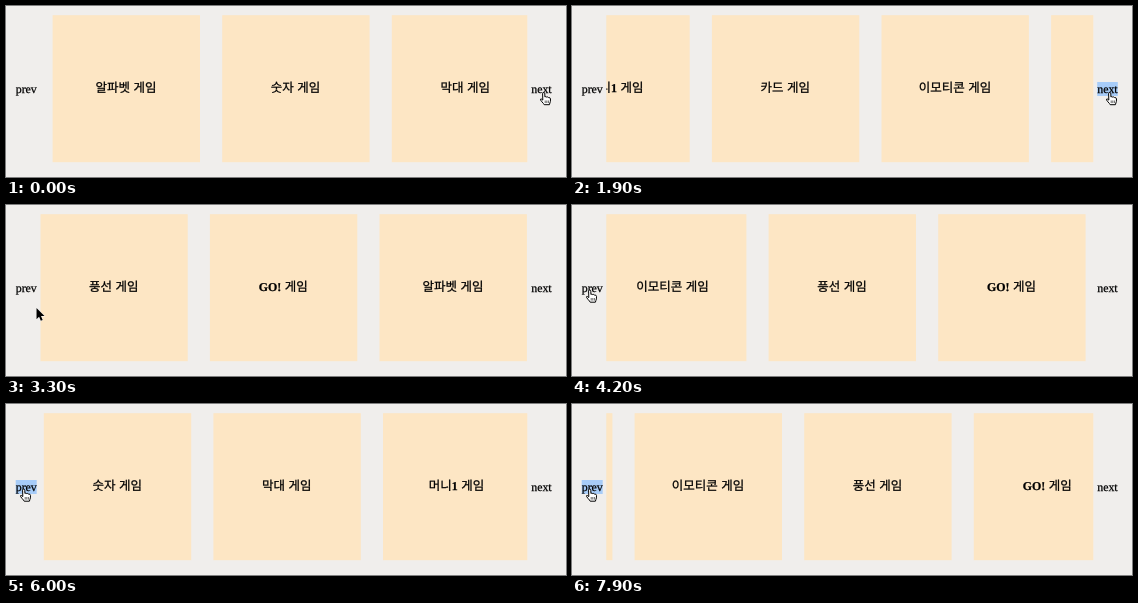
Write an HTML page that moves like this. It is 560 px wide and 171 px high and loops after 8000 ms.

```html
<!DOCTYPE html>
<html lang="ko">
<head>
<meta charset="utf-8">
<title>Card carousel</title>
<style>
  html, body { margin: 0; width: 100%; height: 100%; overflow: hidden; background: #f0eeec; }
  svg { display: block; }
  text { stroke: #000; stroke-width: .25; text-rendering: geometricPrecision; }
  .nav, .latin { font: 11.9px "Liberation Serif", Times, serif; }
  .latin { font-weight: bold; }
  .title { font: 12.5px "Noto Sans CJK KR", "Noto Sans CJK", sans-serif; text-anchor: middle; }
  .mark { fill: #a7ccf8; }
  .card { fill: #fde6c4; }
</style>
</head>
<body>
<svg width="560" height="171" viewBox="0 0 560 171">
  <clipPath id="view"><rect x="34.3" y="0" width="487" height="171"/></clipPath>
  <g clip-path="url(#view)"><g id="track"></g></g>
  <rect id="prevMark" class="mark" x="9.7" y="76" width="21" height="14"/>
  <rect id="nextMark" class="mark" x="525.2" y="76" width="20.6" height="14"/>
  <text class="nav" x="9.7" y="86.5">prev</text>
  <text class="nav" x="525.2" y="86.5">next</text>
  <path id="arrow" fill="#000" stroke="#fff" stroke-width=".9" paint-order="stroke"
        d="M0 0V11.2L2.6 8.8 4.3 12.7 6.2 11.9 4.5 8.1H8Z"/>
  <g id="hand" stroke="#000" stroke-linejoin="round">
    <path fill="#fff" d="M-.8 7.6L-1 1.3Q-1 0 .1 0T1.2 1.3L1.3 4.4Q2.3 3.7 3.1 4.6 4.2 4 5 5.1 6.6 4.7 6.9 6.4L6.8 8.9Q6.3 10.4 5.8 12.2H.6Q.2 11.2-1.6 9.4-3.6 7.2-3 6.6-2.2 6.1-.8 7.6Z"/>
    <path fill="none" stroke-width=".6" d="M1.6 8v2.6M3.2 8v2.6M4.8 8v2.6"/>
  </g>
</svg>
<script>
const LOOP = 8000, STEP = 100, SLIDE = 500;
const LEFT = 34.3, PITCH = 169.6, SIZE = 147.4;
const names = ["풍선", "GO!", "알파벳", "숫자", "막대", "머니1", "카드", "이모티콘"];
const nextClicks = [-336, 200, 735, 1260, 1782, 2125, 2750];
const prevClicks = [3830, 4265, 4693, 5120, 5548, 5975, 6400, 6905, 7365, 7829];
const clicks = [...nextClicks.map(t => [t, 1]), ...prevClicks.map(t => [t, -1])];
// time, x, y of the pointer tip
const pointer = [
  [0, 537.6, 86.5], [2800, 537.6, 86.5], [3300, 30.5, 103],
  [3400, 30.5, 103], [3700, 17.6, 85], [LOOP, 17.6, 85]
];

const $ = id => document.getElementById(id);
const show = (el, on) => { el.style.display = on ? "" : "none"; };
const mod = (a, n) => ((a % n) + n) % n;

const cards = names.map(name => {
  const label = name.replace(/[A-Z0-9!]+/g, s => `<tspan class="latin">${s}</tspan>`);
  const g = document.createElementNS("http://www.w3.org/2000/svg", "g");
  g.innerHTML = `<rect class="card" y="9.2" width="${SIZE}" height="${SIZE - .4}"/>` +
    `<text class="title" x="${SIZE / 2 - .3}" y="86.2">${label} 게임</text>`;
  $("track").append(g);
  return g;
});

// cubic-bezier(.25, .1, .25, 1)
function ease(x) {
  if (x <= 0) return 0;
  if (x >= 1) return 1;
  const curve = (u, a, b) => 3 * (1 - u) * u * ((1 - u) * a + u * b) + u ** 3;
  let lo = 0, hi = 1;
  for (let i = 0; i < 24; i++) {
    const mid = (lo + hi) / 2;
    if (curve(mid, .25, .25) < x) lo = mid; else hi = mid;
  }
  return curve(lo, .1, 1);
}

// Each click restarts the slide from wherever the track is.
function scrollAt(t) {
  let pos = 1, goal = 1;
  clicks.forEach(([start, dir], i) => {
    if (t < start) return;
    const end = i + 1 < clicks.length ? Math.min(t, clicks[i + 1][0]) : t;
    goal += dir;
    pos += (goal - pos) * ease((end - start) / SLIDE);
  });
  return pos;
}

function pointerAt(t) {
  const i = pointer.findIndex(p => p[0] > t);
  const [t0, x0, y0] = pointer[i - 1], [t1, x1, y1] = pointer[i];
  const k = (t - t0) / (t1 - t0), s = k * k * (3 - 2 * k);
  return [x0 + (x1 - x0) * s, y0 + (y1 - y0) * s];
}

function draw(t) {
  const pos = scrollAt(t);
  cards.forEach((card, i) => {
    const x = LEFT + (mod(i - pos + 1, names.length) - 1) * PITCH;
    card.setAttribute("transform", `translate(${x.toFixed(2)} 0)`);
  });
  show($("nextMark"), t >= nextClicks[1] && t < nextClicks[6]);
  show($("prevMark"), t >= prevClicks[1]);

  const [x, y] = pointerAt(t);
  const onLink = y > 76 && y < 90 && (x < 31 || x > 525);
  for (const id of ["hand", "arrow"]) {
    show($(id), (id === "hand") === onLink);
    $(id).setAttribute("transform", `translate(${x.toFixed(1)} ${y.toFixed(1)})`);
  }
}

const begin = performance.now();
function tick() {
  const t = (performance.now() - begin) % LOOP;
  draw(Math.floor(t / STEP) * STEP);
  requestAnimationFrame(tick);
}
tick();
</script>
</body>
</html>
```
